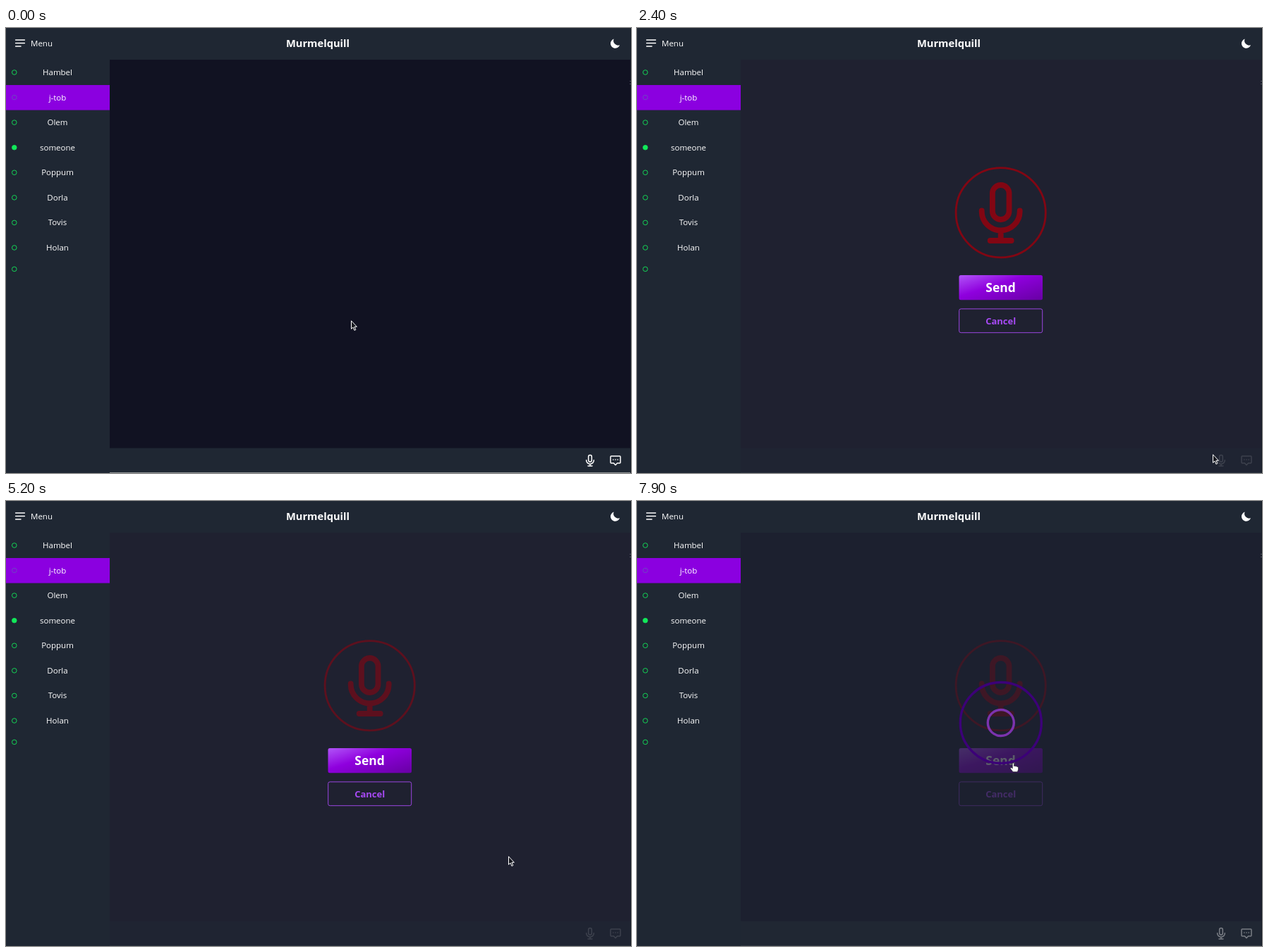
Animation, 886 px wide and 632 px high, one loop 8 s. Source, as an HTML page:

```html
<!DOCTYPE html>
<html lang="en">
<head>
<meta charset="utf-8">
<title>Chat voice message</title>
<style>
  html, body { margin: 0; width: 100%; height: 100%; overflow: hidden; background: #1f2733; }
  svg { display: block; width: 886px; height: 632px; }
  text { font-family: "Open Sans", "Noto Sans", sans-serif; font-size: 11.5px; font-weight: 500; fill: #fff; }
  .mid { text-anchor: middle; }
  .bold { font-weight: 700; }
  .line { fill: none; stroke-linecap: round; stroke-linejoin: round; }
</style>
</head>
<body>
<svg viewBox="0 0 886 632">
  <defs>
    <linearGradient id="violet" gradientUnits="userSpaceOnUse" x1="505" y1="335.5" x2="526" y2="401.5">
      <stop offset="0.05" stop-color="#ad4bf5"/>
      <stop offset="0.42" stop-color="#8f00de"/>
      <stop offset="1" stop-color="#6800a4"/>
    </linearGradient>
    <g id="mic" class="line" stroke-width="7.8">
      <rect x="-11.8" y="-39.5" width="23.6" height="49" rx="11.8"/>
      <path d="M-27-3v1a27 27 0 0 0 54 0v-1M0 25v14.5M-15 39.5h30"/>
    </g>
  </defs>

  <rect width="886" height="632" fill="#1f2733"/>
  <rect id="main" x="147" y="45" width="738" height="552"/>
  <rect id="bar" x="147" y="596.6" width="738" height="34.4"/>
  <rect id="rule" x="147" y="631" width="738" height="1" fill="#8f9394"/>
  <rect x="885" width="1" height="632" fill="#141a24"/>
  <path d="M885 75v1m0 3v1" stroke="#7b8088"/>

  <path class="line" stroke="#fff" stroke-width="1.5" d="M13.6 17h12.8M13.6 21.5h12.8M13.6 26h7.4"/>
  <text x="35" y="26">Menu</text>
  <text class="mid bold" x="442" y="27" style="font-size:14.7px">Murmelquill</text>
  <path fill="#fff" d="M861.6 15.6A6.7 6.7 0 1 0 870 24.2A6.6 6.6 0 0 1 861.6 15.6Z"/>

  <rect y="81" width="147" height="35.6" fill="#8b00e0"/>
  <g id="users"></g>

  <g id="icons" stroke="#fff">
    <use href="#mic" transform="translate(828 614.3) scale(.197)"/>
    <path class="line" stroke-width="1.5" d="M858 608h12q1 0 1 1v8q0 1-1 1h-3.5l-2.5 2.7-2.5-2.7h-3.5q-1 0-1-1v-8q0-1 1-1Z"/>
    <path class="line" stroke-width="1.7" d="M860.8 613h.01M864 613h.01M867.2 613h.01"/>
  </g>

  <g id="modal">
    <g id="record" stroke="#9a000d">
      <circle cx="515.7" cy="262.2" r="63.6" fill="none" stroke-width="2.8"/>
      <use href="#mic" transform="translate(515.7 262.5)"/>
    </g>
    <rect x="456.5" y="351" width="118.5" height="35.3" rx="2.5" fill="url(#violet)"/>
    <text class="mid bold" x="515.5" y="375" style="font-size:17.4px">Send</text>
    <rect x="456.7" y="398.9" width="118" height="33.8" rx="2.5" fill="none" stroke="#9a45e0"/>
    <text class="mid bold" x="515.7" y="420.5" style="font-size:13px;fill:#a84af6">Cancel</text>
  </g>

  <g id="loader" fill="none" stroke-width="3.4">
    <circle cx="515.8" cy="315" stroke="#3c0078"/>
    <circle cx="515.8" cy="315" stroke="#7c33ae"/>
  </g>

  <g id="cursor">
    <path data-kind="arrow" fill="#16181f" stroke="#fff" d="M.5.8V12.4L3.1 10 4.9 14.4 6.8 13.6 5 9.3H8.4Z"/>
    <path data-kind="beam" fill="none" stroke="#e8e8ec" stroke-width="1.2" d="M-3-6h2q1 0 1 1V5q0 1-1 1h-2M3-6H1q-1 0-1 1V5q0 1 1 1h2"/>
    <path data-kind="hand" fill="#fff" stroke="#15171e" stroke-width=".7" d="M-1.8 1.2Q-1.8 0-.7 0T.5 1.2V4.4Q2 3.7 2.7 4.8 4 4.2 4.7 5.3 6.6 4.8 6.6 6.7V9.2L5.4 12.8H-1L-4.6 8.2Q-5.2 7-4 6.5-3 6.4-1.8 7.8Z"/>
  </g>
</svg>
<script>
const LOOP = 8000, STEP = 100;
const $ = id => document.getElementById(id);

const users = ["Hambel", "j-tob", "Olem", "someone", "Poppum", "Dorla", "Tovis", "Holan", ""];
$("users").innerHTML = users.map((name, i) => {
  const y = name ? 63 + i * 35.57 : 342.4;
  const color = i === 1 ? "#6c4fc0" : "#12e85a";
  const fill = i === 3 ? color : "none";
  return `<circle cx="11.8" cy="${y}" r="3.3" fill="${fill}" stroke="${color}" stroke-width=".9"/>
    <text class="mid" x="73" y="${y + 4}">${name}</text>`;
}).join("");

// time, x, y, cursor kind
const path = [
  [0, 489, 415, "arrow"], [600, 489, 415, "arrow"], [700, 499, 427, "arrow"],
  [900, 546, 476, "arrow"], [1000, 546, 476, "arrow"], [1100, 590, 503, "arrow"],
  [1200, 715, 562, "arrow"], [1300, 793, 597, "beam"], [1400, 812, 606, "beam"],
  [1500, 825, 612, "hand"], [1800, 830, 615, "hand"], [2100, 830, 615, "arrow"],
  [2400, 816, 605, "arrow"], [2600, 803, 592, "arrow"], [2800, 764, 553, "arrow"],
  [2900, 732, 524, "arrow"], [3700, 732, 524, "arrow"], [3900, 712, 504, "arrow"],
  [6200, 712, 504, "arrow"], [6600, 701, 488, "arrow"], [6800, 633, 439, "arrow"],
  [6900, 583, 411, "arrow"], [7000, 552, 393, "hand"], [7100, 537, 380, "hand"],
  [7600, 534, 372, "hand"], [8000, 534, 372, "hand"]
];

const fadeIcons = [[1900, 1], [2300, .13], [7700, .13], [7900, .4]];
const fadeRule = [[1900, 1], [2300, .08], [7700, .08], [7900, .15]];
const fadeModal = [[1900, 0], [2300, 1], [7700, 1], [7900, .28]];
const fadeLoader = [[7700, 0], [7900, 1]];
const mainColor = [[1900, 17, 18, 34], [2300, 31, 33, 48], [7700, 31, 33, 48], [7900, 28, 32, 47]];
const barColor = [[1900, 31, 39, 51], [2300, 31, 36, 50], [7700, 31, 36, 50], [7900, 32, 39, 51]];

function sample(rows, t) {
  const next = rows.findIndex(r => r[0] > t);
  if (next === 0) return rows[0].slice(1);
  if (next < 0) return rows[rows.length - 1].slice(1);
  const a = rows[next - 1], b = rows[next];
  const p = (t - a[0]) / (b[0] - a[0]);
  return a.slice(1).map((v, i) => typeof v === "number" ? v + (b[i + 1] - v) * p : v);
}

const fade = (id, rows, t) => $(id).setAttribute("opacity", sample(rows, t)[0]);
const tint = (id, rows, t) => $(id).setAttribute("fill", `rgb(${sample(rows, t).map(Math.round)})`);
const rings = $("loader").children;
const pointers = [...$("cursor").children];

function draw(t) {
  tint("main", mainColor, t);
  tint("bar", barColor, t);
  fade("icons", fadeIcons, t);
  fade("rule", fadeRule, t);
  fade("modal", fadeModal, t);
  fade("loader", fadeLoader, t);

  // Two-second pulse, brightest on even seconds
  $("record").setAttribute("opacity", .73 + .27 * Math.cos(Math.PI * t / 1000));

  const grow = Math.max(0, (t - 7700) / 200);
  rings[0].setAttribute("r", 50 + 7.5 * Math.min(grow, 1));
  rings[1].setAttribute("r", 4 + 14.5 * Math.min(grow, 1));

  const [x, y, kind] = sample(path, t);
  $("cursor").setAttribute("transform", `translate(${Math.round(x)} ${Math.round(y)})`);
  pointers.forEach(p => p.style.display = p.dataset.kind === kind ? "" : "none");
}

function tick(now) {
  draw(Math.floor(now % LOOP / STEP) * STEP);
  requestAnimationFrame(tick);
}
draw(0);
requestAnimationFrame(tick);
</script>
</body>
</html>
```
